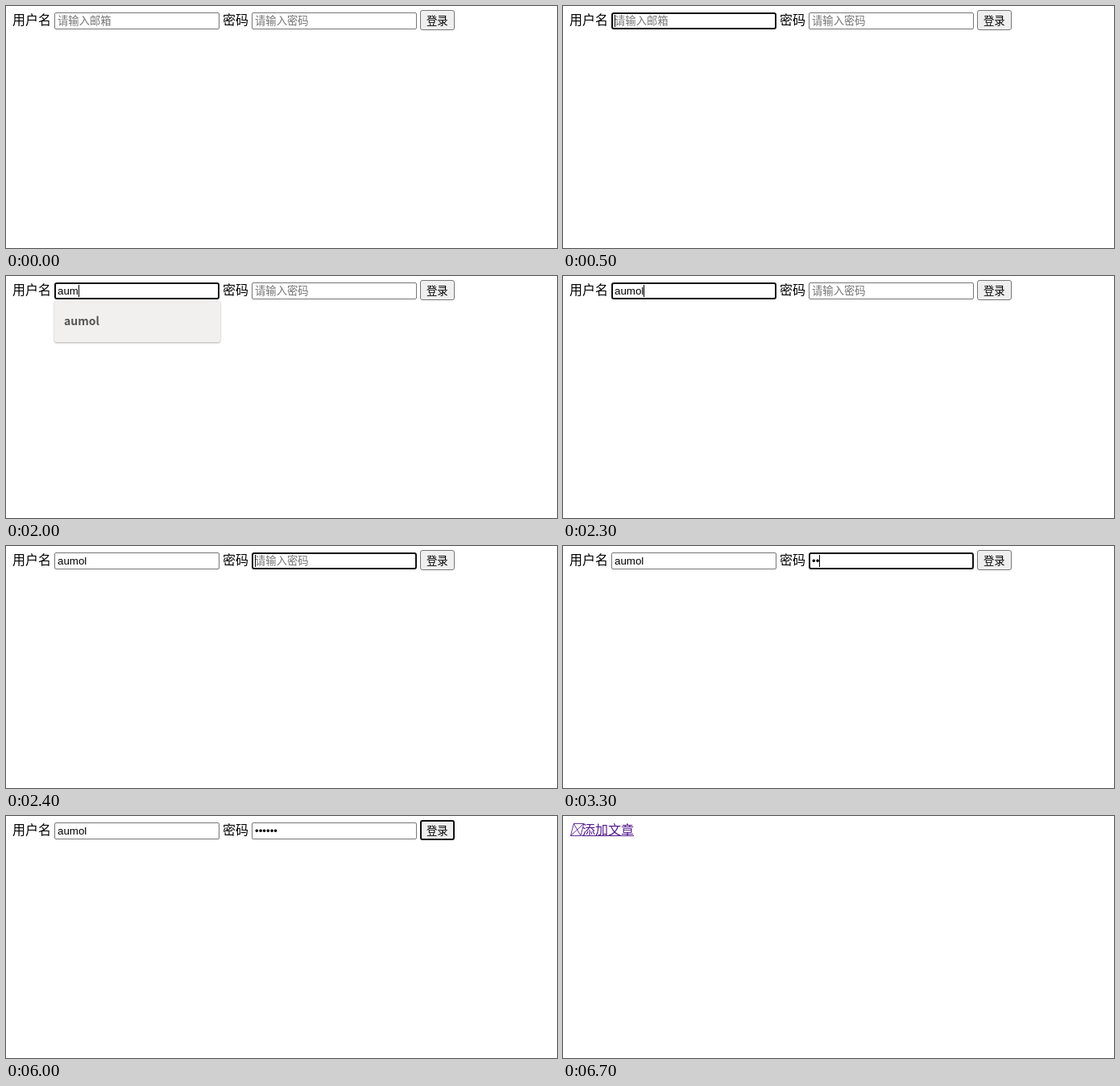
Recreate the animation shown at these times as an HTML page. Size 684 px wide and 300 px high, loop 8 s.

```html
<!DOCTYPE html>
<html lang="zh-CN">
<head>
<meta charset="utf-8">
<style>
  html, body { margin: 0; width: 100%; height: 100%; overflow: hidden; background: #fff; }
  svg { display: block; }
  text { white-space: pre; }
  .label { font: 16px "Noto Sans CJK SC", "Noto Sans CJK", sans-serif; }
  .control { font: 13.3333px "Liberation Sans", Arial, "Noto Sans CJK SC", "Noto Sans CJK", sans-serif; }
  .option { font: bold 14px "Noto Sans CJK SC", "Noto Sans CJK", sans-serif; fill: #555; }
  .link { fill: #551a8b; }
  .hint { fill: #757575; }
  #menu rect { fill: #f1f0ee; filter: drop-shadow(0 1px 1.2px rgba(0, 0, 0, .32)); }
</style>
</head>
<body>
<svg id="stage" width="684" height="300" viewBox="0 0 684 300">
  <g id="form">
    <text class="label" x="8" y="23">用户名</text>
    <text class="label" x="269" y="23">密码</text>
  </g>
  <g id="menu"><rect x="60" y="30" width="206" rx="3"/></g>
  <g id="page">
    <path d="M13.3 9.5H25.8L22 24.5H9.5ZL22 24.5M25.8 9.5L9.5 24.5" fill="none" stroke="#551a8b" stroke-width=".9"/>
    <text class="label link" x="24" y="23">添加文章</text>
    <rect class="link" x="23" y="24" width="65" height="1"/>
  </g>
</svg>
<script>
const LOOP = 8000;
const USER = 'aumol';
const OPTIONS = [USER, 'a', 'atub'];

const userKeys = [1200, 1400, 2000, 2100, 2200];
const passKeys = [3100, 3300, 3900, 4200, 4500, 4900];
const MENU_OPEN = 1200, MENU_CLOSE = 2300;
const USER_FOCUS = 500, PASS_FOCUS = 2400, BUTTON_FOCUS = 6000, PAGE_LOAD = 6700;
const BLINK = 600;

const byId = id => document.getElementById(id);
const form = byId('form'), menu = byId('menu'), page = byId('page');

function add(parent, tag, attrs, content = '') {
  const node = document.createElementNS('http://www.w3.org/2000/svg', tag);
  for (const name in attrs) node.setAttribute(name, attrs[name]);
  node.textContent = content;
  return parent.appendChild(node);
}

const show = (node, visible) => node.setAttribute('display', visible ? 'inline' : 'none');

// A bordered box whose focus ring stays inside its bounds.
function addBox(x, y, width, height, fill, radius) {
  const rect = add(form, 'rect', { fill });
  return focused => {
    const line = focused ? 2 : 1;
    const attrs = {
      x: x + line / 2, y: y + line / 2, width: width - line, height: height - line,
      rx: focused ? 2 : radius, stroke: focused ? '#101010' : '#767676', 'stroke-width': line
    };
    for (const name in attrs) rect.setAttribute(name, attrs[name]);
  };
}

function addField(x, placeholder) {
  const setFocus = addBox(x, 8, 205, 21, '#fff', 1.5);
  const hint = add(form, 'text', { class: 'control hint', x: x + 4, y: 23 }, placeholder);
  const value = add(form, 'text', { class: 'control', x: x + 4, y: 23 });
  const caret = add(form, 'rect', { y: 11, width: 1, height: 15 });
  return (text, focused, caretOn) => {
    setFocus(focused);
    show(hint, !text);
    value.textContent = text;
    const advance = text ? value.getComputedTextLength() : 0;
    caret.setAttribute('x', Math.round(x + 4 + advance));
    show(caret, focused && caretOn);
  };
}

const drawUser = addField(60, '请输入邮箱');
const drawPass = addField(305, '请输入密码');
const drawButton = addBox(514, 5, 43, 25, '#efefef', 2.5);
add(form, 'text', { class: 'control', x: 522, y: 23 }, '登录');

const panel = menu.querySelector('rect');
const rows = OPTIONS.map((name, i) =>
  add(menu, 'text', { class: 'option', x: 72, y: 61 + 36 * i }, name));

const typed = (keys, t) => keys.filter(k => k <= t).length;

function caretVisible(t) {
  const actions = [USER_FOCUS, PASS_FOCUS, ...userKeys, ...passKeys].filter(k => k <= t);
  return (t - Math.max(0, ...actions)) % (2 * BLINK) < BLINK;
}

function drawMenu(prefix, open) {
  show(menu, open);
  const matches = OPTIONS.filter(name => name.startsWith(prefix));
  panel.setAttribute('height', 16 + 36 * matches.length);
  rows.forEach((row, i) => { row.textContent = matches[i] || ''; });
}

function render(t) {
  const onPage = t >= PAGE_LOAD;
  show(form, !onPage);
  show(page, onPage);
  const user = USER.slice(0, typed(userKeys, t));
  const caretOn = caretVisible(t);
  drawUser(user, t >= USER_FOCUS && t < PASS_FOCUS, caretOn);
  drawPass('•'.repeat(typed(passKeys, t)), t >= PASS_FOCUS && t < BUTTON_FOCUS, caretOn);
  drawButton(t >= BUTTON_FOCUS);
  drawMenu(user, t >= MENU_OPEN && t < MENU_CLOSE);
}

const start = performance.now();
function tick() {
  render((performance.now() - start) % LOOP);
  requestAnimationFrame(tick);
}
tick();
</script>
</body>
</html>
```
